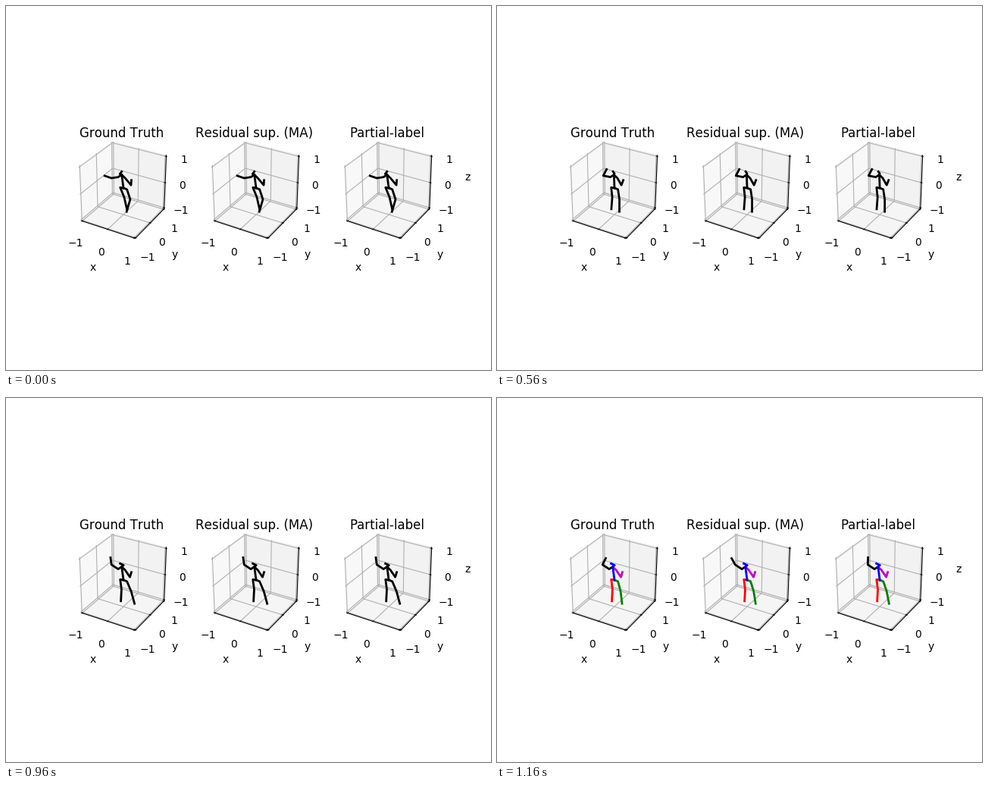
Write a matplotlib script that moves like this. It is 640 px wide and 480 px high and loops after 1180 ms.

```python
import numpy as np
import matplotlib.pyplot as plt
from matplotlib.animation import FuncAnimation

W, H, DPI = 640, 480, 100
FRAMES, STEP = 59, 20
PREDICT = 49            # first predicted frame
TITLES = ["Ground Truth", "Residual sup. (MA)", "Partial-label"]

SIDE = 0.775 * W / 3.4  # side of one square panel
GAP = 1.2 * SIDE
LEFT, BOTTOM = 0.125 * W, H * 0.505 + SIDE / 2
SCALE = SIDE / 0.185
E = 1 + 1 / 24          # pane distance from the cube centre
DELTA = 1 / 6
PER_POINT = 48 / (144 * SIDE / DPI)

plt.rcParams["font.family"] = "DejaVu Sans"
plt.rcParams["text.kerning_factor"] = 6
fig = plt.figure(figsize=(W / DPI, H / DPI), dpi=DPI, facecolor="white")
ax = fig.add_axes([0, 0, 1, 1])
ax.set_xlim(0, W)
ax.set_ylim(H, 0)
ax.axis("off")


def project(points):
    """Perspective view at azimuth -60, elevation 30, in panel pixels."""
    p = np.atleast_2d(points) / 2
    a, e = np.radians(-60), np.radians(30)
    eye = np.array([np.cos(a) * np.cos(e), np.sin(a) * np.cos(e), np.sin(e)])
    right = np.array([-np.sin(a), np.cos(a), 0])
    up = np.cross(eye, right)
    depth = 10 - p @ eye
    x = LEFT + SCALE * (0.095 + p @ right / depth)
    y = BOTTOM - SCALE * (0.095 + p @ up / depth)
    return np.column_stack([x, y])


def line(points, dx, **style):
    xy = project(points)
    return ax.plot(xy[:, 0] + dx, xy[:, 1], **style)[0]


def label(point, dx, text, va):
    x, y = project(point)[0]
    ax.text(x + dx, y, text, ha="center", va=va, fontsize=10, zorder=5)


def draw_box(dx, with_z):
    square = [(-E, -E), (E, -E), (E, E), (-E, E)]
    walls = [(0.95, [(-E, u, v) for u, v in square]),
             (0.90, [(u, E, v) for u, v in square]),
             (0.925, [(u, v, -E) for u, v in square])]
    for shade, corners in walls:
        xy = project(corners)
        panes.append(ax.fill(xy[:, 0] + dx, xy[:, 1], color=str(shade),
                             alpha=0.5, lw=1, zorder=1)[0])

    for t in (-1, 0, 1):
        for path in ([(t, -E, -E), (t, E, -E), (t, E, E)],
                     [(E, t, -E), (-E, t, -E), (-E, t, E)],
                     [(-E, -E, t), (-E, E, t), (E, E, t)]):
            grid.append(line(path, dx, color="#b0b0b0", lw=0.8, zorder=2))

    edge = dict(color="black", lw=0.8, zorder=3)
    corners = [(-E, -E, -E), (E, -E, -E), (E, E, -E), (E, E, E)]
    for ends in zip(corners, corners[1:]):
        line(ends, dx, **edge)

    out, inn = E + 0.1 * DELTA, E - 0.2 * DELTA
    far = E + 11.5 * PER_POINT * DELTA
    for t in (-1, 0, 1):
        line([(t, -out, -E), (t, -inn, -E)], dx, **edge)
        line([(out, t, -E), (inn, t, -E)], dx, **edge)
        line([(out, E, t), (inn, E, t)], dx, **edge)
        text = str(t).replace("-", "\u2212")
        for point in ((t, -far, -far), (far, t, -far), (far, far, t)):
            label(point, dx, text, "top")

    far = E + 25 * PER_POINT * DELTA
    label((0, -far, -far), dx, "x", "center")
    label((far, 0, -far), dx, "y", "center")
    if with_z:
        label((far, far, 0), dx, "z", "center")


# Observed motion at a few key times: forearm angle in degrees from
# upright, height of that elbow, and the x of both feet
KEYS = [0, 11, 19, 37, 48]
FOREARM = [-71, -26, -27, 83, -8]
ELBOW_Y = [227, 228, 223.5, 224, 219.8]
FOOT_A = [159.5, 153, 153.5, 148.3, 151.6]
FOOT_B = [159.2, 162, 160.6, 162.4, 169.6]

# Predicted forearm angle and foot x per panel, from first to last
FORECAST = [((-33, 27), (167.8, 165)),
            ((-25, -29), (168.7, 166.2)),
            ((10, 2), (167.4, 167.2))]

CHAINS = [
    ("k", "black", ["neck", "arm_a", "elbow_a", "hand_a"]),
    ("m", "#646464", ["neck", "arm_b", "elbow_b", "hand_b"]),
    ("r", "#262626", ["pelvis", "hip_a", "knee_a", "foot_a"]),
    ("g", "#2c2c2c", ["pelvis", "hip_b", "knee_b", "foot_b"]),
    ("b", "#505050", ["pelvis", "neck", "nose", "crown"]),
]


def knee(hip, foot, bow):
    """A point just above the middle of the leg, bent to the right."""
    return (hip[0] + 0.45 * (foot[0] - hip[0]) + bow,
            hip[1] + 0.45 * (foot[1] - hip[1]))


def pose(f, panel):
    """Joints in first-panel pixels."""
    angle, elbow_y, foot_a, foot_b = (
        np.interp(f, KEYS, track) for track in (FOREARM, ELBOW_Y, FOOT_A, FOOT_B))
    if f >= PREDICT:
        span = (PREDICT, FRAMES - 1)
        angle, foot_b = (np.interp(f, span, ends) for ends in FORECAST[panel])

    s = min(f / KEYS[-1], 1)
    sway = 1.7 * np.sin(np.pi * s)
    turn = 5 * (1 - np.cos(np.pi * s)) / 2
    angle = np.radians(angle)

    j = dict(pelvis=(155, 240), hip_a=(150.7, 239.3), hip_b=(159.6, 241.8))
    neck = 152.7 + sway
    j["neck"] = (neck, 222.6)
    j["nose"] = (neck - 2.5 + turn, 221.5 - s)
    j["crown"] = (neck - 2.2 * s, 218.3)
    j["arm_a"] = (148 + sway, 225.6)
    j["elbow_a"] = (139.2 + 0.6 * sway, elbow_y)
    j["hand_a"] = (j["elbow_a"][0] + 9.5 * np.sin(angle),
                   elbow_y - 9.5 * np.cos(angle))
    j["arm_b"] = (157.3 + sway, 227)
    j["elbow_b"] = (165 - 1.5 * s, 236.2)
    j["hand_b"] = (165.5 + 0.7 * sway, 229.7)
    j["foot_a"] = (foot_a, 267.8)
    j["foot_b"] = (foot_b, 271.2)
    j["knee_a"] = knee(j["hip_a"], j["foot_a"], 1.3)
    j["knee_b"] = knee(j["hip_b"], j["foot_b"], 1.1 + 3.4 * np.exp(-f / 4))
    return j


panes, grid, limbs = [], [], []
for i, title in enumerate(TITLES):
    dx = i * GAP
    draw_box(dx, with_z=i == 2)
    ax.text(LEFT + SIDE / 2 + dx, BOTTOM - 0.92 * SIDE - 6 * DPI / 72, title,
            fontsize=12, ha="center", va="baseline", zorder=5)
    limbs.append([ax.plot([], [], color="k", lw=2, zorder=4)[0] for _ in CHAINS])


def update(f):
    grey = f == PREDICT
    fig.set_facecolor("#d3d3d3" if grey else "white")
    for pane in panes:
        pane.set_visible(not grey)
    for g in grid:
        g.set_color("#919191" if grey else "#b0b0b0")
    for i, lines in enumerate(limbs):
        joints = pose(f, i)
        for limb, (color, shade, names) in zip(lines, CHAINS):
            xy = np.array([joints[n] for n in names])
            limb.set_data(xy[:, 0] + i * GAP, xy[:, 1])
            limb.set_color(shade if grey else color if f > PREDICT else "k")
    return []


anim = FuncAnimation(fig, update, frames=FRAMES, interval=STEP,
                     init_func=lambda: update(0), repeat=True, repeat_delay=0)
plt.show()
```
